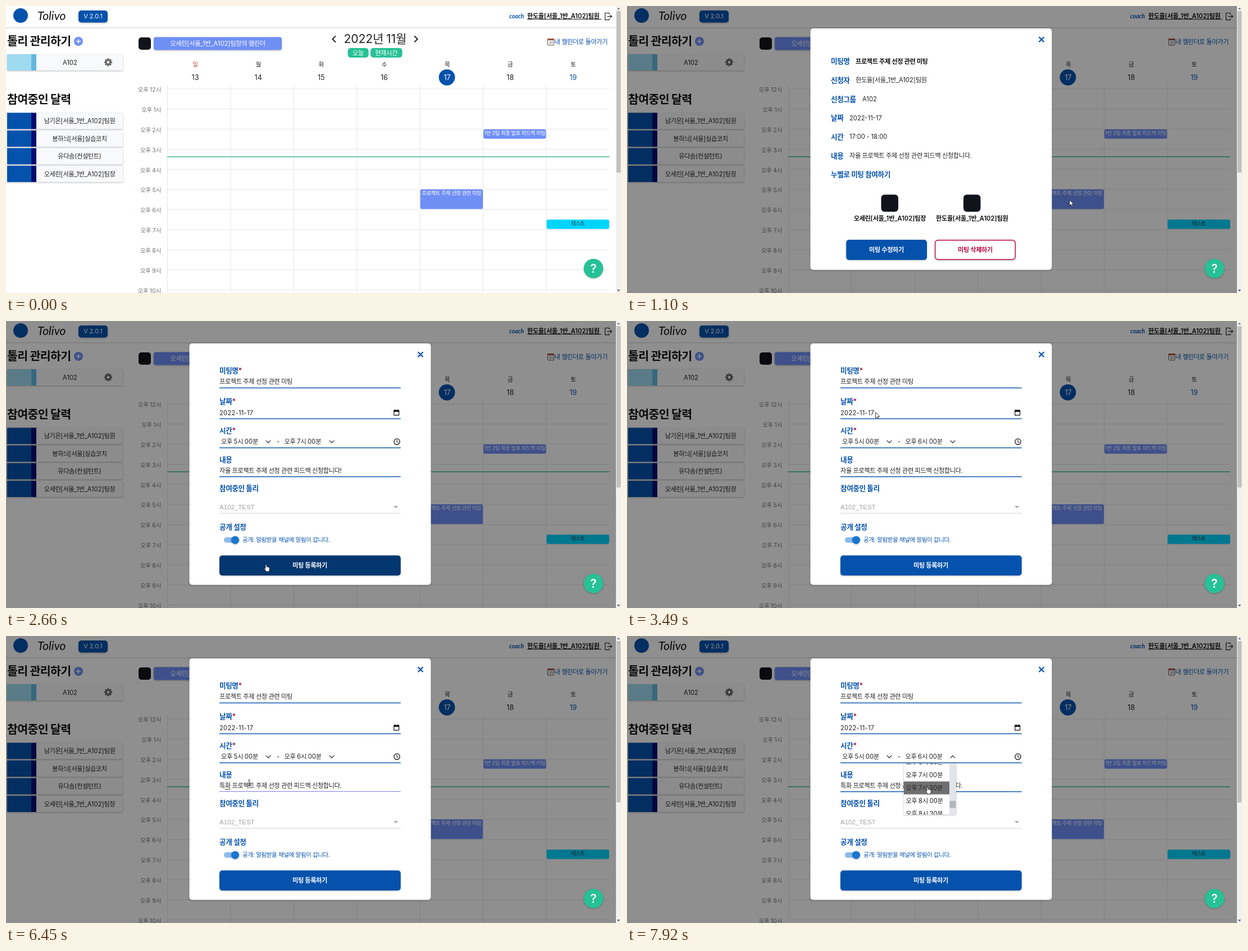
These frames come from a looping animation (1095 by 512 pixels, 7.99 s). An HTML page:

```html
<!DOCTYPE html>
<html lang="ko">
<head>
<meta charset="utf-8">
<title>Calendar</title>
<style>
html, body { margin: 0; width: 100%; height: 100%; overflow: hidden; background: #fff; }
svg { display: block; }
text { font-family: Inter, 'Noto Sans CJK KR', 'Noto Sans CJK', sans-serif; white-space: pre; }
tspan.k { letter-spacing: -.035em; }
.card { filter: drop-shadow(0 1.4px 1.6px rgba(0,0,0,.28)); }
.line { fill: none; stroke-linecap: butt; }
</style>
</head>
<body>
<svg id="stage" width="1095" height="512" viewBox="0 0 1095 512"></svg>
<script>
const LOOP = 7990;
const BLUE = '#0552ac', DARK = '#04366f', SOFT = '#6f8ff5', GREEN = '#27c196', INK = '#222';
const ME = '한도율[서울_1반_A102]팀원', LEAD = '오세린[서울_1반_A102]팀장';
const TOPIC = '프로젝트 주제 선정 관련 미팅';
const BODY = ' 프로젝트 주제 선정 관련 피드백 신청합니다';

const spaced = s => s.replace(/[가-힣ㄱ-ㅎ ]+/g, '<tspan class="k">$&</tspan>');

// Text placed by its visual middle line.
function txt(x, y, s, { size = 11.2, fill = INK, w = 400, a = 'start', id = '', extra = '' } = {}) {
  return `<text ${id && `id="${id}"`} x="${x}" y="${y + size * .37}" font-size="${size}" fill="${fill}" font-weight="${w}" text-anchor="${a}" ${extra}>${spaced(s)}</text>`;
}
const mid = (x, y, s, o = {}) => txt(x, y, s, { a: 'middle', ...o });
const rect = (x, y, w, h, fill, r = 0, extra = '') =>
  `<rect x="${x}" y="${y}" width="${w}" height="${h}" rx="${r}" fill="${fill}" ${extra}/>`;
const circle = (x, y, r, fill, extra = '') => `<circle cx="${x}" cy="${y}" r="${r}" fill="${fill}" ${extra}/>`;
const path = (d, color, w, extra = '') => `<path class="line" d="${d}" stroke="${color}" stroke-width="${w}" ${extra}/>`;
const range = (n, f) => Array.from({ length: n }, (_, i) => f(i)).join('');

function header() {
  return rect(0, 38, 1086, 1, '#dcdcdc') + rect(0, 39, 1086, 1.5, '#f1f1f1') +
    circle(26, 17, 13, BLUE) +
    txt(56, 17, 'Tolivo', { size: 21, fill: '#111', extra: `style="font-family:Lato,sans-serif;font-style:italic"` }) +
    rect(129, 8, 52, 21.5, BLUE, 5, 'class="card"') +
    mid(155, 18.3, 'V 2.0.1', { fill: '#fff', size: 11 }) +
    txt(896, 18, 'coach', { size: 10.6, fill: BLUE, w: 700, extra: `style="font-family:Lato,sans-serif;font-style:italic"` }) +
    txt(928, 17.5, ME, { w: 600, fill: '#111' }) + rect(928, 23.2, 132, 1, '#111') +
    path('M1074 15V12.5H1066.7V24.7H1074V22.2M1070.5 18.6H1078.5M1075.8 15.8L1078.6 18.6L1075.8 21.4', '#222', 1.2);
}

function sideRow(y, x, name, light, edge) {
  return `<g class="card">${rect(2, y, 206, 29, '#f8f9fb', 1.5)}${rect(2, y, 43.5, 29, light)}${rect(45, y, 9, 29, edge)}</g>` +
    mid(x, y + 14.5, name);
}

function sidebar() {
  const people = ['남기온[서울_1반_A102]팀원', '봉하늬[서울]실습코치', '유다솜(컨설턴트)', LEAD];
  const title = { size: 20.6, w: 700, fill: '#111' };
  const teeth = range(8, i => rect(180.5, 93.2, 3, 3, '#666', .6, `transform="rotate(${i * 45} 182 100.3)"`));
  return txt(2, 62.5, '톨리 관리하기', title) +
    circle(129, 63, 8, SOFT) + path('M124.8 63H133.2M129 58.8V67.2', '#fff', 1.6) +
    sideRow(86, 114, 'A102', '#9edbf0', '#62b8dc') +
    teeth + circle(182, 100.3, 3.9, 'none', 'stroke="#666" stroke-width="3"') +
    txt(2, 166.5, '참여중인 달력', title) +
    people.map((p, i) => sideRow(190.5 + i * 31.5, 131, p, BLUE, '#020a70')).join('');
}

function calendar() {
  const rowY = i => 148 + i * 35.84, colX = i => 287.5 + i * 112.42;
  const days = [...'일월화수목금토'];
  const event = (x, y, h, fill, name, color = '#fff') =>
    rect(x, y, 111.5, h, fill, 3) + mid(x + 55.8, y + 6.3, name, { size: 9.1, fill: color });
  return rect(236, 56, 22, 22, '#10131a', 5) +
    rect(263, 55.5, 228, 23, SOFT, 4, 'class="card"') + mid(377, 67, LEAD + '의 캘린더', { fill: '#fff' }) +
    path('M587 53.3L581.3 59L587 64.7M727 53.3L732.7 59L727 64.7', '#111', 1.8) +
    mid(657, 58, '2022년 11월', { size: 21 }) +
    rect(608.5, 75, 37, 17, GREEN, 5) + mid(627, 83.5, '오늘', { fill: '#fff' }) +
    rect(649, 75, 56.5, 17, GREEN, 5) + mid(677, 83.5, '현재시간', { fill: '#fff' }) +
    rect(964.5, 58.5, 11, 11.5, '#fff', 1, 'stroke="#6d4c41"') + rect(964, 58, 12, 3.2, '#a1553f') +
    mid(970, 66, '31', { size: 6.3, fill: '#333' }) +
    txt(976.5, 64, '내 캘린더로 돌아가기', { fill: BLUE }) +
    circle(785, 127.3, 14.4, BLUE) +
    days.map((d, i) => {
      const x = 337 + i * 112.15;
      return mid(x, 104, d, { fill: i ? INK : '#b0524a', size: 10.6 }) +
        mid(x, 127.3, String(13 + i), { size: 12.6, fill: i == 4 ? '#fff' : i == 6 ? BLUE : INK });
    }).join('') +
    range(11, i => rect(287, rowY(i) - .5, 787, 1, '#e6e6e6') +
      txt(276, rowY(i) + 1.3, `오후 ${i || 12}시`, { size: 10.5, fill: '#70757a', a: 'end' })) +
    range(7, i => rect(colX(i) - .5, 141, 1, 371, '#e6e6e6')) +
    event(850, 220, 16.7, SOFT, '1반 2팀 최종 발표 피드백 미팅') +
    event(737.6, 327, 35.3, SOFT, TOPIC) +
    event(962.5, 381, 16.8, '#00d5ff', '테스트', '#333') +
    rect(287, 268.2, 787, 1.5, '#3dba98');
}

function viewPane() {
  const rows = [['미팅명', 407, TOPIC], ['신청자', 407, ME], ['신청그룹', 419, 'A102'], ['날짜', 396, '2022-11-17'],
    ['시간', 396, '17:00 - 18:00'], ['내용', 396, `자율${BODY}.`], ['누벨로 미팅 참여하기', 0, '']];
  const bold = { w: 600, fill: '#111' };
  return rows.map(([k, x, v], i) => {
    const y = 98.5 + i * 33.7;
    return txt(363, y, k, { size: 12.6, w: 600, fill: BLUE }) + txt(x, y, v, i ? {} : bold);
  }).join('') +
    rect(452.5, 336.5, 30.5, 30.5, '#10131a', 6) + rect(599, 336.5, 30.5, 30.5, '#10131a', 6) +
    mid(468, 379.3, LEAD, bold) + mid(614.3, 379.3, ME, bold) +
    rect(390.3, 417, 143.7, 36, BLUE, 5, 'id="edit" class="card"') + mid(462, 435, '미팅 수정하기', { w: 600, fill: '#fff' }) +
    rect(548.7, 417.7, 142.6, 34.6, '#fff', 5, 'class="card" stroke="#b8083c" stroke-width="1.4"') +
    mid(620, 435, '미팅 삭제하기', { w: 600, fill: '#b8083c' });
}

function formPane() {
  const label = (y, s, star) => txt(380, y, s, { size: 12.6, w: 600, fill: BLUE }) +
    (star ? txt(star, y, '*', { size: 12.6, w: 600, fill: '#a3123a' }) : '');
  const under = y => rect(380, y - .7, 322.7, 1.4, BLUE);
  const chevron = x => `M${x - 4.3} 213.2L${x} 217.5L${x + 4.3} 213.2`;
  return label(88.5, '미팅명', 413.5) + txt(380, 108.3, TOPIC) + under(119.4) +
    label(143.5, '날짜', 402.5) + txt(380, 163.5, '2022-11-17', { extra: 'letter-spacing=".25"' }) + under(174.4) +
    rect(690.8, 159.4, 8.8, 8.8, 'none', .5, 'stroke="#111" stroke-width="1.2"') + rect(690.3, 159, 9.8, 3, '#111') +
    rect(692, 157.8, 1.3, 2, '#111') + rect(697, 157.8, 1.3, 2, '#111') +
    label(195, '시간', 402.5) + txt(383, 215.3, '오후 5시 00분') + path(chevron(467), '#222', 1.2) +
    txt(482, 215, '-') + txt(495.5, 215.3, '', { id: 'endTime' }) + path(chevron(580), '#222', 1.2, 'id="chev"') +
    circle(696, 215.3, 5.2, 'none', 'stroke="#111" stroke-width="1.3"') + path('M696 212V215.5L698.3 217', '#111', 1.1) + under(226.3) +
    label(247, '내용') + txt(380, 267, '', { id: 'memo' }) +
    rect(380, 277, 322.7, 1.4, BLUE, 0, 'id="memoLine"') +
    rect(390, 273, 9.5, .9, '#222', 0, 'id="compose"') + rect(0, 260.5, 1.1, 13, '#000', 0, 'id="caret"') +
    label(298.5, '참여중인 톨리') +
    txt(380, 331.3, 'A102_TEST', { size: 11.5, fill: '#a3a3a3', extra: `style="font-family:'Liberation Sans',sans-serif"` }) +
    `<path d="M690 330H698L694 334Z" fill="#a8a8a8"/>` + rect(380, 342.5, 322.7, 1, '#cfcfcf') +
    label(367, '공개 설정') + rect(388, 385.8, 25, 9.8, '#8cbae8', 4.9) + circle(408, 390.8, 7.1, '#1976d2', 'class="card"') +
    txt(421, 389.8, '공개: 알림받을 채널에 알림이 갑니다.', { size: 10.5, fill: BLUE }) +
    rect(380, 418.3, 322.7, 35.7, BLUE, 5, 'id="save" class="card"') + mid(541, 436, '미팅 등록하기', { w: 600, fill: '#fff' });
}

function dropdown() {
  const items = range(48, i => {
    const h = i >> 1;
    return txt(3.5, i * 23 + 11.5, `${h < 12 ? '오전' : '오후'} ${h % 12 || 12}시 ${i % 2 ? '30' : '00'}분`);
  });
  return `<g id="drop"><g class="card">${rect(493, 227.5, 93, 91, '#fff')}</g>
    <svg x="493" y="227.5" width="93" height="91">
      <g id="items">${rect(0, 39 * 23, 81, 23, '#707070', 0, 'id="hover"')}${items}</g>
      ${rect(81, 0, 12, 91, '#e1e5ea')}${rect(81.5, 0, 11, 13, '#b3b7bc', 2, 'id="thumb"')}
    </svg></g>`;
}

const cursors = `
  <g id="arrow"><path d="M0 0V10.2L2.4 8L4 11.6L5.6 10.9L4 7.4H7.2Z" fill="#fff" stroke="#222" stroke-width=".9"/></g>
  <g id="hand"><path d="M-1.1 .9Q0-.6 1.1 .9V4.6Q2.4 3.9 3 5Q4.3 4.5 4.8 5.6Q6.4 5.3 6.4 7V9Q6.2 10.6 5.2 11.5V13H-.2V11.8L-3.4 7.7Q-3.3 6.2-1.1 7.7Z" fill="#fff" stroke="#222" stroke-width=".9"/></g>
  <g id="beam"><path d="M-2-5.3H-.6L0-4.7L.6-5.3H2M0-4.7V4.7M-2 5.3H-.6L0 4.7L.6 5.3H2" fill="none" stroke="#222" stroke-width="1"/></g>`;

const stage = document.getElementById('stage');
stage.innerHTML = rect(0, 0, 1095, 512, '#fff') + header() + sidebar() + calendar() +
  `<g id="modal">${rect(0, 0, 1086, 512, 'rgba(0,0,0,.44)')}${rect(326.5, 40, 430, 430.7, '#fff', 5, 'class="card"')}
    ${path('M733.5 55.2L742.5 64.2M742.5 55.2L733.5 64.2', BLUE, 2.2)}
    <g id="view">${viewPane()}</g><g id="form">${formPane()}</g>${dropdown()}</g>` +
  circle(1046, 468.3, 17.3, GREEN, 'class="card"') + mid(1046, 468, '?', { size: 21, w: 600, fill: '#fff' }) +
  rect(1086, 0, 9, 512, '#f1f1f1') + rect(1087, 9, 7.4, 288, '#c1c1c1') +
  '<path d="M1088 6L1090.6 2.8L1093.2 6Z" fill="#777"/><path d="M1088 506L1090.6 509.2L1093.2 506Z" fill="#555"/>' +
  `<g id="pointer">${circle(0, 1, 9, '#a9b62c', 'id="ring" opacity=".75"')}${cursors}</g>`;

const $ = Object.fromEntries([...stage.querySelectorAll('[id]')].map(e => [e.id, e]));
const show = (el, on) => { el.style.display = on ? '' : 'none'; };
const setText = (el, s) => { if (el.dataset.s !== s) { el.dataset.s = s; el.innerHTML = spaced(s); } };
const clamp = v => Math.min(1, Math.max(0, v));
const within = (t, a, b) => t >= a && t < b;
const last = (table, t) => table.reduce((r, row) => t >= row[0] ? row : r, table[0]);

// start, end, from x, from y, to x, to y
const moves = [
  [410, 830, 1065, 493, 788, 346], [1160, 1790, 788, 346, 463, 434],
  [2870, 3290, 463, 434, 448, 114], [3290, 3630, 448, 114, 433, 250], [3700, 3770, 433, 250, 433, 262],
  [6920, 7270, 433, 262, 581, 217], [7410, 7650, 581, 217, 581, 236],
  [7720, 7850, 581, 256, 581, 298], [7850, 7920, 581, 298, 535, 269]
];
// time, typed word, caret x (0 = hidden)
const typing = [
  [0, '자율', 0], [3770, '자율', 432], [3890, '자율', 422], [3960, '자율', 412], [4030, '자율', 402.5],
  [4100, '자율', 400], [4170, '자율', 390], [4500, '자율', 0], [4640, '자율', 400], [4900, '자', 390],
  [5040, '', 380], [5240, 'ㅌ', 390], [5350, '트', 390], [5560, '특', 390],
  [5760, '특ㅎ', 400], [5830, '특호', 400], [5900, '특화', 400], [6450, '특화', 0]
];
const clicks = [[1020, 1100], [2530, 2600], [3770, 3840], [7340, 7410]];
const drag = [[0, 0], [7720, 260], [7790, 620], [7850, 865]];

function mix(a, b, k) {
  const n = (c, i) => parseInt(c.slice(1 + i * 2, 3 + i * 2), 16);
  return `rgb(${[0, 1, 2].map(i => Math.round(n(a, i) + (n(b, i) - n(a, i)) * k))})`;
}

function place(t) {
  const [a, b, x0, y0, x1, y1] = last(moves, t);
  const stepped = Math.floor((t - a + 2) / 69) * 69;
  const k = clamp(t >= b ? 1 : stepped / (b - a)), e = k * k * (3 - 2 * k);
  return [x0 + (x1 - x0) * e, y0 + (y1 - y0) * e];
}

function shape(t, x, y) {
  const over = (l, tp, r, b) => x >= l && x <= r && y >= tp && y <= b;
  if (t < 1100) return over(738, 327, 849, 362) ? 'hand' : 'arrow';
  if (t < 2600) return over(390, 417, 534, 453) ? 'hand' : 'arrow';
  if (over(380, 418, 703, 454)) return 'hand';
  if (over(380, 102, 703, 119) || over(380, 256, 703, 277) && t < 7340) return 'beam';
  if (over(493, 207, 590, 226) || t >= 7920) return 'hand';
  return 'arrow';
}

function draw(t) {
  const form = t >= 2600, open = t >= 7340, focus = within(t, 3770, 7340);
  show($.modal, t >= 1100);
  show($.view, !form);
  show($.form, form);
  show($.drop, open);

  const [x, y] = place(t), kind = shape(t, x, y);
  show($.pointer, t >= 410);
  $.pointer.setAttribute('transform', `translate(${x.toFixed(1)} ${y.toFixed(1)})`);
  for (const k of ['arrow', 'hand', 'beam']) show($[k], k === kind);
  show($.ring, clicks.some(([a, b]) => within(t, a, b)));

  $.edit.setAttribute('fill', mix(BLUE, DARK, clamp((t - 1800) / 330)));
  $.save.setAttribute('fill', mix(DARK, BLUE, clamp((t - 2940) / 250)));

  const stale = t < 2730, [, word, caret] = last(typing, t);
  setText($.endTime, `오후 ${stale ? 7 : 6}시 00분`);
  setText($.memo, word + BODY + (stale ? '!' : '.'));
  show($.caret, caret && focus);
  $.caret.setAttribute('x', caret - .5);
  show($.compose, within(t, 5240, 7340));
  $.compose.setAttribute('x', t < 5760 ? 380 : 390);
  $.memoLine.setAttribute('fill', focus ? '#7b7df0' : BLUE);
  $.memoLine.setAttribute('height', focus ? 1 : 1.4);

  const scroll = last(drag, t)[1];
  $.chev.setAttribute('transform', open ? 'rotate(180 580 215.4)' : '');
  $.items.setAttribute('transform', `translate(0 ${-scroll})`);
  $.thumb.setAttribute('y', scroll / 1013 * 78);
  show($.hover, t >= 7920);
}

const start = performance.now();
(function tick() {
  draw((performance.now() - start) % LOOP);
  requestAnimationFrame(tick);
})();
</script>
</body>
</html>
```
